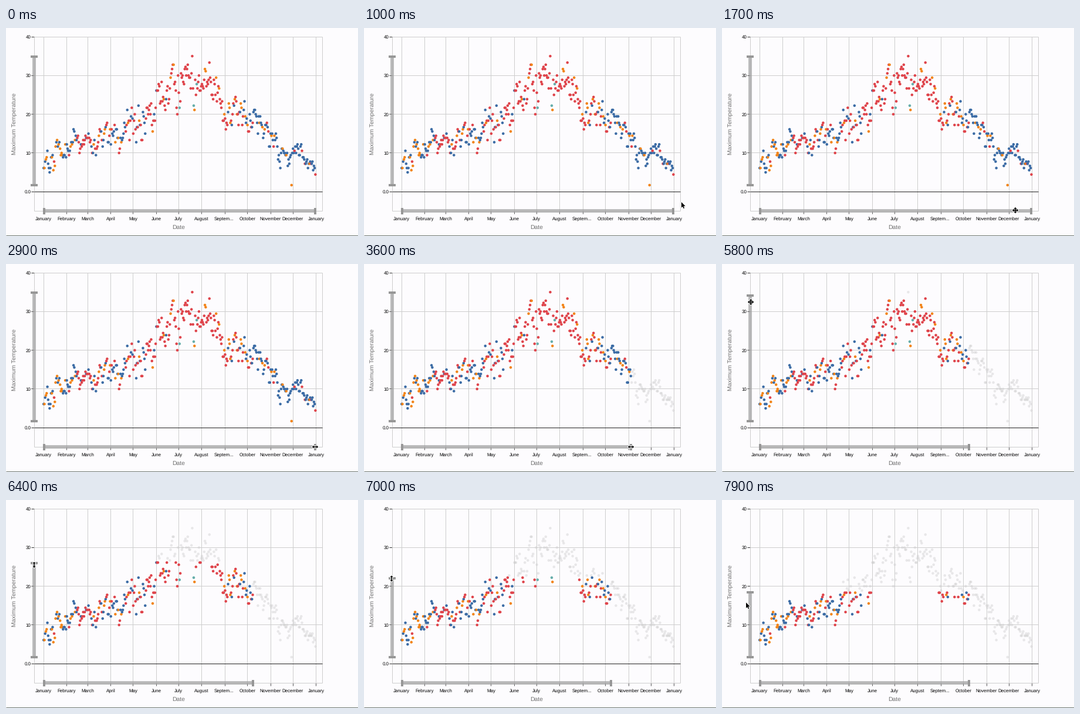
These frames come from a looping animation (600 by 356 pixels, 8000 ms). A matplotlib script:

```python
import numpy as np
import matplotlib.pyplot as plt
from matplotlib.animation import FuncAnimation
from matplotlib.colors import to_rgba
from matplotlib.patches import Polygon, Rectangle
from matplotlib.patheffects import withStroke

W, H, DPI = 600, 356, 100
PT = 72 / DPI
FRAMES, STEP = 80, 100
LEFT, RIGHT, TOP, BOTTOM = 48, 539, 15, 313
X0, DAY = 64.2, 464.5 / 365
Y0, DEG = 280.2, 6.63
X_END, Y_END = 527, 269

RAIN, SUN, FOG, DRIZZLE = "#3c6ca5", "#df444b", "#f28418", "#66aeab"
DIM = to_rgba("#cccccc", 0.42)
GRID, BAR, CAP, TITLE = "#cdcdcd", "#a0a0a0", "#979797", "#707070"

# (day, value) knots: mean temperature, its spread, share of sunny and foggy days
MEAN = [(0, 6), (20, 10), (40, 13.5), (58, 11.5), (85, 15), (110, 15.5), (135, 19),
        (157, 25), (180, 28.5), (225, 27), (243, 20.5), (270, 19), (290, 17.5),
        (310, 11.5), (331, 7.5), (339, 13), (350, 8), (364, 5.5)]
SPREAD = [(0, 1.5), (20, 2.6), (58, 1.2), (100, 2.8), (150, 3.5), (225, 3.3),
          (250, 2.1), (300, 2), (364, 0.9)]
SUNSHINE = [(0, 0.05), (40, 0.1), (50, 0.7), (65, 0.35), (110, 0.5), (150, 0.8),
            (165, 0.92), (235, 0.9), (260, 0.5), (290, 0.1), (364, 0.3)]
MIST = [(0, 0.45), (40, 0.2), (60, 0.08), (200, 0.05), (260, 0.2), (295, 0.3),
        (320, 0.08), (364, 0.08)]
HOTTEST, COLDEST = (199, 35.0), (332, 1.7)


def knots(points, x):
    return np.interp(x, *zip(*points))


def make_weather():
    rng = np.random.default_rng(12)
    days = np.arange(365)
    drift = np.zeros(365)
    for day in days[1:]:
        drift[day] = 0.5 * drift[day - 1] + 0.87 * np.clip(rng.normal(), -1.8, 1.8)
    temps = knots(MEAN, days) + drift * knots(SPREAD, days)
    temps = np.round(np.clip(temps, 4.4, 34.4) * 1.8) / 1.8  # whole Fahrenheit steps
    for day, temp in (HOTTEST, COLDEST):
        temps[day] = temp
    sun = knots(SUNSHINE, days)
    mist = sun + knots(MIST, days)
    luck = rng.random(365)
    summer = abs(days - 200) < 36
    kinds = np.select([luck < sun, luck < mist, summer & (luck < mist + 0.03)],
                      [SUN, FOG, DRIZZLE], RAIN)
    kinds[HOTTEST[0]], kinds[COLDEST[0]] = SUN, FOG
    return X0 + days * DAY, Y0 - temps * DEG, np.array([to_rgba(k) for k in kinds])


plt.rcParams["font.family"] = "Liberation Sans"
plt.rcParams["text.hinting"] = "none"
fig = plt.figure(figsize=(W / DPI, H / DPI), dpi=DPI, facecolor="#fdfcfe")
ax = fig.add_axes([0, 0, 1, 1])
ax.set(xlim=(0, W), ylim=(H, 0))
ax.axis("off")


def line(x1, y1, x2, y2, color=GRID, z=1):
    # Half a pixel back, so that snapping fills the pixel holding the point
    ax.plot([x1 - 0.5, x2 - 0.5], [y1 - 0.5, y2 - 0.5], color=color, lw=PT, zorder=z,
            solid_capstyle="butt")


def label(x, y, text, size, color="black", **kw):
    ax.text(x, y, text, fontsize=size * PT, color=color, **kw)


def rect(color, z, alpha=1):
    return ax.add_patch(Rectangle((0, 0), 1, 1, fc=color, lw=0, zorder=z, alpha=alpha))


# Axes and grid
MONTHS = ["January", "February", "March", "April", "May", "June", "July", "August",
          "Septem...", "October", "November", "December", "January"]
LENGTHS = [31, 28, 31, 30, 31, 30, 31, 31, 30, 31, 30, 31]
for name, day in zip(MONTHS, np.cumsum([0] + LENGTHS)):
    x = X0 + day * DAY
    line(x, TOP, x, BOTTOM)
    line(x, BOTTOM, x, BOTTOM + 5, "#555555")
    label(x - (2 if "..." in name else 0.3), 328.9, name, 7.85, ha="center")
for temp in range(0, 41, 10):
    y = Y0 - temp * DEG
    line(LEFT, y, RIGHT, y, GRID if temp else "#222222", 1 if temp else 2)
    line(43, y, LEFT, y, "#333333")
    label(42.2, y + 2.9, str(temp) if temp else "0.0", 7.85, ha="right")
line(LEFT, TOP, LEFT, BOTTOM)
line(RIGHT, TOP, RIGHT, BOTTOM)
line(LEFT, BOTTOM, RIGHT, BOTTOM)
line(0, 355, W + 1, 355, "#6d766f")
label(293.8, 343.5, "Date", 10.4, TITLE, ha="center")
label(14.2, 164.5, "Maximum Temperature", 10.4, TITLE, rotation=90,
      ha="center", va="center")

dot_x, dot_y, dot_colors = make_weather()
dots = ax.scatter(dot_x, dot_y, s=(4.5 * PT) ** 2, c=dot_colors, lw=0, zorder=3)

# Range sliders
x_bar, y_bar = rect(BAR, 4, 0.7), rect(BAR, 4, 0.7)
x_caps = [rect(CAP, 5) for _ in range(2)]
y_caps = [rect(CAP, 5) for _ in range(2)]


def place_sliders(right, top):
    x_bar.set_bounds(X0, 310, right - X0, 6)
    y_bar.set_bounds(45, top, 6, Y_END - top)
    for cap, x in zip(x_caps, (X0 + 0.3, right)):
        cap.set_bounds(x - 2, 308, 4, 11)
    for cap, y in zip(y_caps, (top, Y_END)):
        cap.set_bounds(42, y - 2, 12, 4)


# Mouse pointers, relative to the hot spot
ARM = np.array([(0.8, 0.8), (2.4, 0.8), (2.4, 2.7), (5.2, 0), (2.4, -2.7), (2.4, -0.8)])


def quarter_turns(shape, n):
    for _ in range(n):
        shape = np.column_stack([shape[:, 1], -shape[:, 0]])
    return shape


EAST_WEST = np.vstack([ARM[1:], -ARM[1:]])
POINTERS = {
    "arrow": np.array([(0, 0), (0, 9.5), (2.2, 7.6), (3.7, 11), (5.2, 10.3),
                       (3.8, 7), (6.7, 6.8)]),
    "move": np.vstack([quarter_turns(ARM, n) for n in range(4)]),
    "ew": EAST_WEST,
    "ns": quarter_turns(EAST_WEST, 1),
}
pointer = ax.add_patch(Polygon(POINTERS["arrow"], fc="black", lw=0, zorder=9))
pointer.set_path_effects([withStroke(linewidth=1.3, foreground="white")])

# (ms, position) of the dragged handles, (ms, x, y) of the mouse
RIGHT_PATH = [(2950, X_END), (4000, 420.5)]
TOP_PATH = [(5650, 49), (6500, 110), (7500, 158)]
MOUSE_PATH = [(1000, 541, 298), (1700, 500, 312), (2200, 500, 312), (2600, 527, 313),
              (2950, 527, 313), (4000, 420.5, 313), (4500, 277.3, 203.5),
              (4700, 277.3, 203.5), (5400, 49.5, 49), (5500, 49.5, 49),
              (6400, 48, 111), (6500, 48, 111), (7500, 46, 158), (7900, 41, 175.5)]


def follow(path, ms):
    """Ease in and out between the key points of a path."""
    times, *tracks = zip(*path)
    step = np.interp(ms, times, np.arange(len(times)))
    k, t = divmod(step, 1)
    step = k + t * t * (3 - 2 * t)
    return [np.interp(step, np.arange(len(times)), track) for track in tracks]


def pointer_kind(x, y, right, top):
    if abs(y - 313) < 6 and X0 < x < right + 6:
        return "ew" if abs(x - right) < 6 else "move"
    if abs(x - LEFT) < 6 and top - 7 < y < Y_END:
        return "ns" if abs(y - top) < 7 else "move"
    return "arrow"


def update(i):
    ms = i * STEP
    right, = follow(RIGHT_PATH, ms)
    top, = follow(TOP_PATH, ms)
    x, y = follow(MOUSE_PATH, ms)
    place_sliders(right, top)
    inside = (dot_x <= right + 1) & (dot_y >= top - 2)
    dots.set_facecolors(np.where(inside[:, None], dot_colors, DIM))
    pointer.set_visible(ms >= MOUSE_PATH[0][0])
    pointer.set_xy(POINTERS[pointer_kind(x, y, right, top)] + (x, y))
    return dots, pointer


anim = FuncAnimation(fig, update, frames=FRAMES, interval=STEP, repeat=True,
                     repeat_delay=0, blit=False)
plt.show()
```
